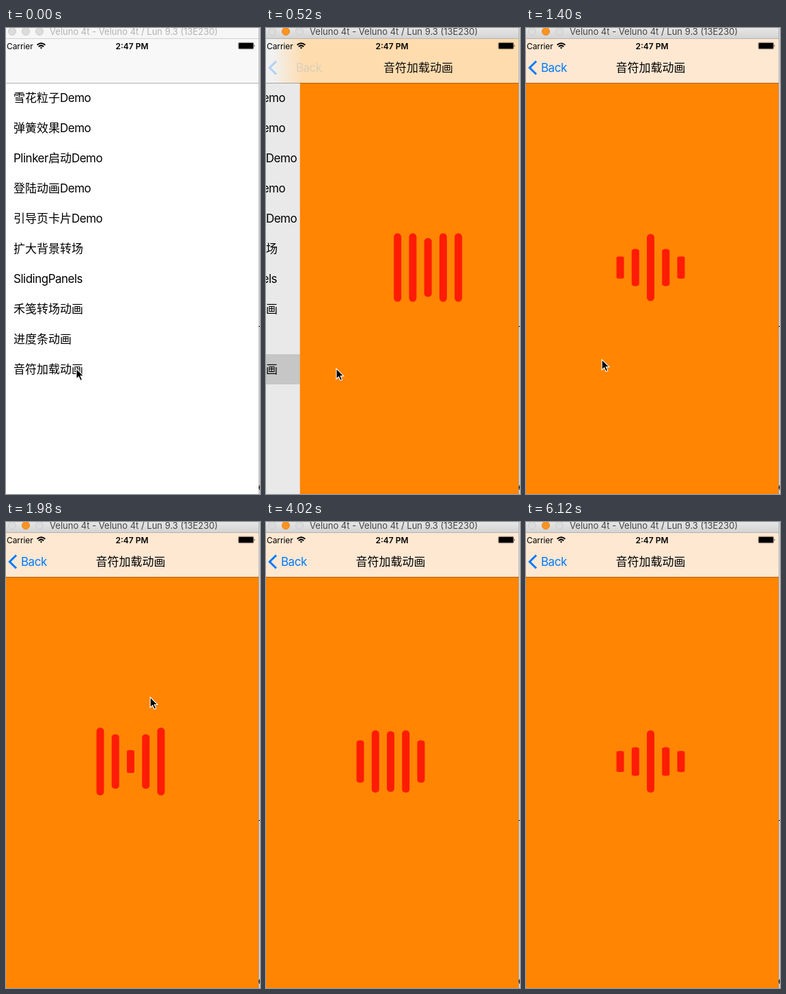
Recreate the animation shown at these times as an HTML page. Size 372 by 680 pixels, loop 6140 ms.

```html
<!DOCTYPE html>
<html lang="zh">
<head>
<meta charset="utf-8">
<style>
html, body { margin: 0; width: 100%; height: 100%; overflow: hidden; background: #fff; }
svg { display: block; width: 372px; height: 680px; }
text { font-family: Inter, "Noto Sans CJK SC", "Noto Sans CJK", sans-serif; white-space: pre; }
.row { font-size: 17px; }
.latin { letter-spacing: -.5px; }
</style>
</head>
<body>
<svg viewBox="0 0 372 680">
  <defs>
    <clipPath id="phone"><rect y="16" width="370" height="664"/></clipPath>
    <linearGradient id="chrome" x2="0" y2="1">
      <stop stop-color="#e6e6e6"/><stop offset="1" stop-color="#d2d2d2"/>
    </linearGradient>
    <linearGradient id="tint" gradientUnits="userSpaceOnUse">
      <stop id="tintA" stop-opacity="0"/><stop id="tintB" offset="1"/>
    </linearGradient>
  </defs>
  <rect width="372" height="680" fill="#fff"/>
  <g clip-path="url(#phone)">
    <g id="list">
      <rect id="picked" x="-5" y="476" width="375" height="44" fill="#d9d9d9"/>
    </g>
    <rect id="dim" width="370" height="680"/>
    <g id="page">
      <rect x="-5" y="16" width="375" height="664" fill="#ff8503"/>
      <g id="bars" fill="#ff1c04"></g>
    </g>
    <rect id="nav" y="16" width="370" height="64"/>
    <rect id="glow" y="16" width="370" height="64" fill="url(#tint)"/>
    <rect y="80" width="370" height="1" fill="#000" fill-opacity=".3"/>
    <path id="chevron" d="M15 48.5L5.3 58L15 67.5" fill="none" stroke="#007aff" stroke-width="3"/>
    <text id="back" class="row latin" x="22" y="64" fill="#007aff">Back</text>
    <text id="title" class="row" x="182.5" y="64.3" text-anchor="middle" font-weight="500">音符加载动画</text>
    <text x="1" y="31" font-size="12" letter-spacing="-.1">Carrier</text>
    <g fill="none" stroke="#000" stroke-width="2">
      <path d="M45.6 24.8Q51.5 19.6 57.4 24.8M47.8 27.2Q51.5 24 55.2 27.2"/>
      <path d="M51.5 30.6L49.8 28.7Q51.5 27.5 53.2 28.7Z" fill="#000" stroke="none"/>
    </g>
    <text x="184.5" y="31" font-size="12" font-weight="600" text-anchor="middle">2:47 PM</text>
    <rect x="340.3" y="21.3" width="22.4" height="9.4" rx="1.8" fill="none" stroke="#000" stroke-width=".5"/>
    <rect x="341" y="22" width="21" height="8" rx="1"/>
    <path d="M363.6 24.2Q365.4 26 363.6 27.8Z"/>
  </g>
  <rect id="head" width="370" height="16"/>
  <rect id="headLine" y="15" width="370" height="1"/>
  <g id="lights" stroke-width="1"></g>
  <text id="caption" x="64" y="10" font-size="13">Veluno 4t - Veluno 4t / Lun 9.3 (13E230)</text>
  <rect x="370" width="1" height="680" fill="#adadad"/>
  <rect x="371" width="1" height="680" fill="#dedede"/>
  <rect x="370" y="435" width="2" height="1" fill="#222"/>
  <text x="369.5" y="674" font-size="11">e</text>
  <path id="cursor" d="M0 0V15.2L3.5 11.9L6 17.4L8.6 16.3L6.2 10.9H10.9Z" stroke="#fff" stroke-width="1.1"/>
</svg>
<script>
const LOOP = 6140, CLICK = 260, PUSH = 329, PUSH_MS = 500, WIDTH = 375;
const el = id => document.getElementById(id);
const clamp = v => Math.max(0, Math.min(1, v));
const smooth = v => (v = clamp(v)) * v * (3 - 2 * v);

function add(parent, tag, attrs, text) {
  const node = document.createElementNS("http://www.w3.org/2000/svg", tag);
  set(node, attrs);
  if (text) node.textContent = text;
  return parent.appendChild(node);
}
function set(node, attrs) {
  for (const k in attrs) node.setAttribute(k, attrs[k]);
}
const move = (id, x, y = 0) => set(el(id), { transform: `translate(${x} ${y})` });

const rows = ["雪花粒子Demo", "弹簧效果Demo", "Plinker启动Demo", "登陆动画Demo", "引导页卡片Demo",
  "扩大背景转场", "SlidingPanels", "禾笺转场动画", "进度条动画", "音符加载动画"];
rows.forEach((label, i) => {
  const row = add(el("list"), "text", { class: "row", x: 11, y: 108 + 44 * i });
  for (const part of label.match(/[A-Za-z]+|[^A-Za-z]+/g))
    add(row, "tspan", /[A-Za-z]/.test(part) ? { class: "latin" } : {}, part);
});

const bars = [0, 1, 2, 3, 4].map(() =>
  add(el("bars"), "rect", { x: -5.5, y: -50, width: 11, height: 100, rx: 5.5 }));
const lights = [9, 29, 49].map(cx => add(el("lights"), "circle", { cx, cy: 5, r: 5.5 }));

// decelerating cubic bezier (.38,.7) (.125,1)
function ease(x) {
  if (x <= 0 || x >= 1) return clamp(x);
  const at = (s, a, b) => 3 * (1 - s) * (1 - s) * s * a + 3 * (1 - s) * s * s * b + s * s * s;
  let lo = 0, hi = 1;
  for (let i = 0; i < 24; i++) {
    const mid = (lo + hi) / 2;
    if (at(mid, .38, .125) < x) lo = mid; else hi = mid;
  }
  return at(lo, .7, 1);
}

// start of each bar's swing, from the middle bar outwards
const starts = [262, 562, 740];
function barScale(t, ring) {
  const age = t - 80 * (1 - smooth((t - 540) / 360)) - starts[ring];
  return age < 0 ? 1 : .653 + .347 * Math.cos(2 * Math.PI * age / 1200);
}

// time, x, y
const track = [[0, 103, 497], [1050, 103, 497], [1400, 111, 484], [1500, 121, 460],
  [1980, 211, 256], [2350, 271, 120], [3360, 271, 120], [3700, 292, -24]];
function cursorAt(t) {
  const i = track.findIndex(k => k[0] > t);
  if (i < 0) return [292, -24];
  const [a, b] = [track[i - 1], track[i]], f = (t - a[0]) / (b[0] - a[0]);
  return [a[1] + (b[1] - a[1]) * f, a[2] + (b[2] - a[2]) * f];
}

function draw(t) {
  const active = t >= CLICK, p = ease((t - PUSH) / PUSH_MS), rest = WIDTH * (1 - p);

  set(el("head"), { fill: active ? "url(#chrome)" : "#f6f6f6" });
  set(el("headLine"), { fill: active ? "#b4b4b4" : "#d2d2d2" });
  set(el("caption"), { fill: active ? "#444" : "#b2b2b2" });
  lights.forEach((c, i) => set(c, active && i === 1
    ? { fill: "#fd9321", stroke: "#e9851a" } : { fill: "#dcdcdc", stroke: "#cbcbcb" }));

  set(el("picked"), { opacity: active ? 1 : 0 });
  move("list", -.3 * WIDTH * p);
  set(el("dim"), { "fill-opacity": .1 * p });
  move("page", rest);

  const edge = rest - 5, settled = smooth((p - .95) / .05);
  const tone = `rgb(255 ${220 + 12 * settled} ${174 + 36 * settled})`;
  const shade = 248 - 8 * p;
  set(el("nav"), { fill: `rgb(${shade} ${shade} ${shade})` });
  set(el("glow"), { opacity: clamp(p * 8) });
  set(el("tint"), { x1: edge - 40, x2: edge + 5 * (1 - settled), y1: 0, y2: 0 });
  set(el("tintA"), { "stop-color": tone });
  set(el("tintB"), { "stop-color": tone });

  move("title", .74 * rest);
  set(el("title"), { opacity: clamp(p * 1.1) });
  move("back", .4 * rest);
  set(el("back"), { opacity: clamp((p - .83) / .17) });
  set(el("chevron"), { opacity: clamp((p - .8) / .2) });

  bars.forEach((bar, i) => set(bar, {
    transform: `translate(${182.5 + 22.25 * (i - 2)} 349.5) scale(1 ${barScale(t, Math.abs(i - 2))})`
  }));
  move("cursor", ...cursorAt(t));
}

const begin = performance.now();
function tick() {
  draw((performance.now() - begin) % LOOP);
  requestAnimationFrame(tick);
}
draw(0);
requestAnimationFrame(tick);
</script>
</body>
</html>
```
